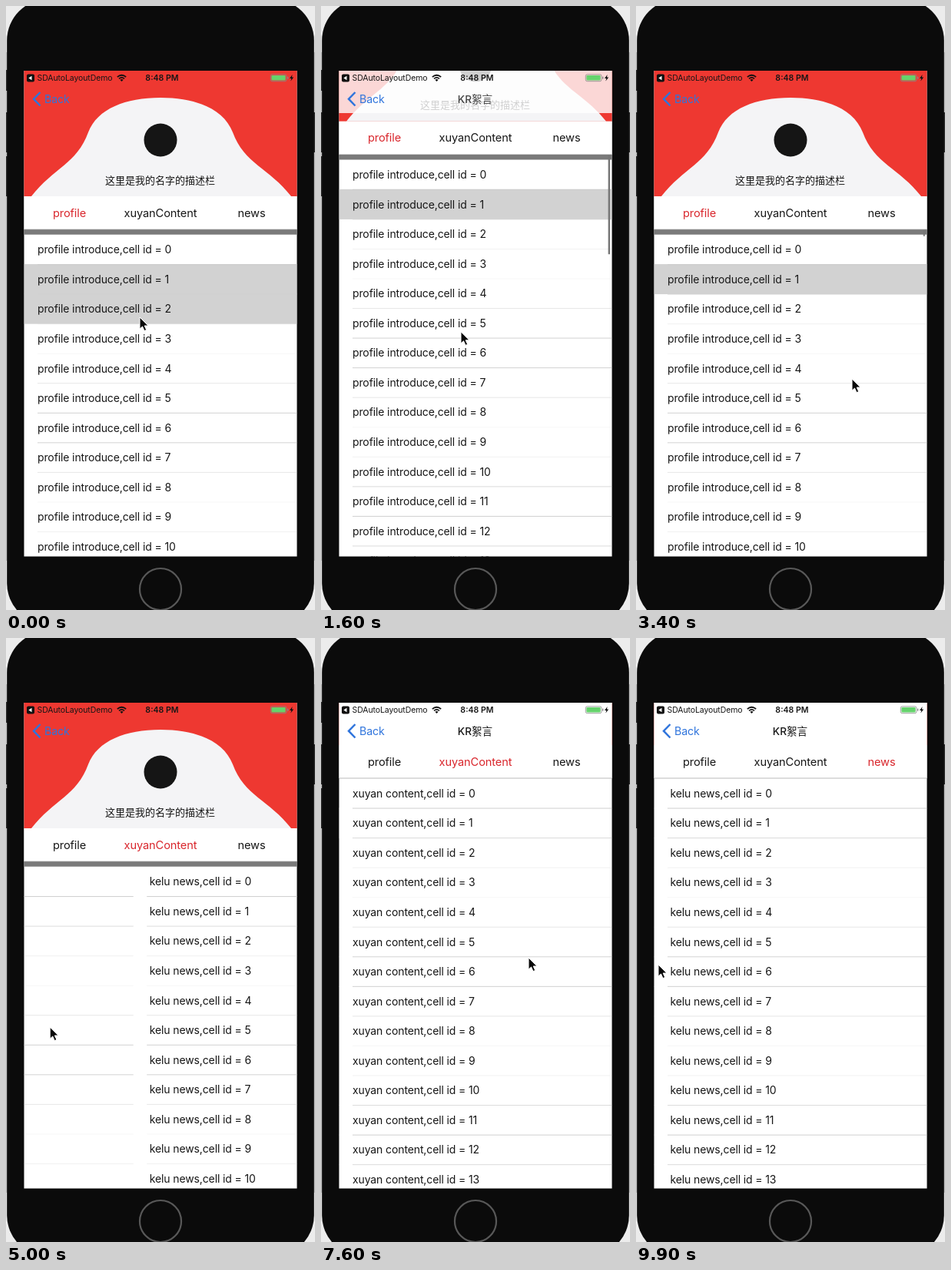
An HTML page for the animation above (10000 ms loop, 402 by 784 pixels).

```html
<!DOCTYPE html>
<html lang="zh-CN">
<head>
<meta charset="utf-8">
<title>Profile tabs</title>
<style>
  html, body { margin: 0; width: 100%; height: 100%; overflow: hidden; background: #e4e4e4; }
  svg { display: block; width: 100%; height: 100%; }
  text { font-family: Inter, "Noto Sans CJK SC", "Noto Sans CJK", sans-serif; fill: #161616; }
  .cell { font-size: 14px; letter-spacing: -.12px; }
  .tab { font-size: 14.6px; letter-spacing: -.1px; text-anchor: middle; }
  .mid { text-anchor: middle; }
</style>
</head>
<body>
<svg viewBox="0 0 402 784" preserveAspectRatio="none">
  <defs>
    <clipPath id="screenClip"><rect x="23.5" y="84" width="355" height="630.5"/></clipPath>
  </defs>
  <rect width="402" height="784" fill="#ececec"/>
  <rect y="60" width="402" height="660" fill="#c8c8c8"/>
  <g fill="#333">
    <rect y="83" width="3" height="27"/><rect y="138" width="3" height="52"/>
    <rect y="195" width="3" height="52"/><rect x="399" y="138" width="3" height="52"/>
  </g>
  <rect x="1.2" y="-9" width="399.6" height="812" rx="54" fill="#0b0b0b"/>
  <circle cx="201" cy="757" r="27" fill="none" stroke="#585858" stroke-width="2.2"/>

  <g clip-path="url(#screenClip)">
    <rect x="23" y="84" width="356" height="631" fill="#fff"/>
    <g id="pages"></g>
    <rect id="band" x="23" width="356" height="6.7" fill="#7a7a7a"/>
    <g id="header">
      <rect x="23" y="84" width="356" height="163" fill="#ee3831"/>
      <path d="M33 247C62 210 92 205 107 164C119 133 156 119 201 119S283 133 295 164C310 205 342 210 371 247Z" fill="#f4f4f6"/>
      <circle cx="201" cy="174" r="21.5" fill="#151515"/>
      <text class="mid" x="200.5" y="230.5" font-size="13">这里是我的名字的描述栏</text>
      <rect x="23" y="247" width="356" height="43" fill="#fff"/>
      <rect x="23" y="289.5" width="356" height=".7" fill="#bbb"/>
      <g id="tabs"></g>
    </g>
    <rect id="thumb" x="373.6" width="2.4" rx="1.2" fill="#777"/>

    <rect id="nav" x="23" y="84" width="356" height="55" fill="#fff"/>
    <text id="title" class="mid" x="200.5" y="125.5" font-size="13.6" font-weight="500">KR絮言</text>
    <path d="M44.5 112L36 120.7L44.5 129.5" fill="none" stroke="#2f74dc" stroke-width="2.5"/>
    <text x="50" y="126" font-size="14.2" letter-spacing="-.1" style="fill:#2f74dc">Back</text>

    <rect x="27" y="88.5" width="10" height="10" rx="2" fill="#111"/>
    <path d="M33.5 90.7L29.3 93.5L33.5 96.3Z" fill="#fff"/>
    <text x="40.5" y="97.3" font-size="10.5" letter-spacing="-.1">SDAutoLayoutDemo</text>
    <path d="M144.8 92.2Q150.5 87.3 156.2 92.2M147 94.4Q150.5 91.5 154 94.4" fill="none" stroke="#111" stroke-width="1.7"/>
    <path d="M148.4 95.8Q150.5 94.2 152.6 95.8L150.5 98Z" fill="#111"/>
    <text class="mid" x="203" y="97.3" font-size="10.6" font-weight="600">8:48 PM</text>
    <rect x="344.3" y="88.8" width="20.6" height="8.9" rx="2" fill="none" stroke="#888" stroke-width=".8"/>
    <rect x="345.4" y="89.9" width="18.2" height="6.7" rx="1" fill="#65d36c"/>
    <rect x="366" y="91.7" width="1.3" height="3" fill="#888"/>
    <path d="M372.6 89L369 93.9H371.2L370.4 97.6L374.2 92.5H371.9Z" fill="#111"/>
  </g>
  <path id="cursor" d="M0 0V15.2L3.5 12L6 17.6L8.7 16.4L6.2 11H11Z" fill="#080808" stroke="#fff" stroke-width="1"/>
</svg>
<script>
const LOOP = 10000, STEP = 100;
const PAGE = 355, ROW = 38.55, TOP = 297, ROWS = 19;
const STICK = 108, COLLAPSED = 114.5;
const SVG = 'http://www.w3.org/2000/svg';
const $ = id => document.getElementById(id);

function set(el, attrs) {
  for (const key in attrs) el.setAttribute(key, attrs[key]);
}
function add(parent, tag, attrs, text = '') {
  const el = document.createElementNS(SVG, tag);
  set(el, attrs);
  el.textContent = text;
  return parent.appendChild(el);
}
const clamp = (v, low = 0, high = 1) => Math.max(low, Math.min(high, v));
const ease = u => u * u * (3 - 2 * u);
const progress = (t, from, to) => ease(clamp((t - from) / (to - from)));
const mix = (a, b, u) => a + (b - a) * u;

// Each gesture drags from (x, y), either scrolling by pixels or turning a page.
const gestures = [
  { from: 1000, to: 2000, x: 182, y: 520, scroll: 150 },
  { from: 2400, to: 3300, x: 281, y: 332, scroll: -150 },
  { from: 3600, to: 4200, x: 281, y: 490, turn: 1 },
  { from: 4660, to: 5260, x: 270, y: 505, turn: 1 },
  { from: 5900, to: 6550, x: 268, y: 572, scroll: COLLAPSED },
  { from: 7000, to: 7500, x: 40, y: 430, turn: -1 },
  { from: 7700, to: 8200, x: 240, y: 400, scroll: -COLLAPSED },
  { from: 8500, to: 9020, x: 248, y: 527, scroll: COLLAPSED },
  { from: 9300, to: 9800, x: 240, y: 424, turn: 1 }
];

// Replays the gestures up to time t.
function stateAt(t) {
  const state = { scroll: 0, page: 0, settled: 0, thumb: 0, x: 174, y: 404 };
  let idleSince = 200;
  for (const { from, to, x, y, scroll = 0, turn = 0 } of gestures) {
    const reach = progress(t, idleSince, from), u = progress(t, from, to);
    state.x = clamp(mix(state.x, x, reach) - turn * PAGE * u, 29, 300);
    state.y = mix(state.y, y, reach) - scroll * u;
    state.scroll += scroll * u;
    state.page += turn * u;
    if (t >= to) state.settled += turn;
    if (scroll) state.thumb = Math.max(state.thumb, clamp((t - from) / 100) * clamp((to + 350 - t) / 300));
    idleSince = to;
  }
  return state;
}

const tabs = ['profile', 'xuyanContent', 'news'].map((name, i) =>
  add($('tabs'), 'text', { class: 'tab', x: 82.5 + 118.5 * i, y: 273.7 }, name));

const pressed = [1, 2].map(i => add($('pages'), 'rect',
  { x: 23.5, y: TOP + i * ROW - .5, width: PAGE, height: ROW + .5, fill: '#d2d2d2' }));

const pages = [['profile introduce', 41], ['xuyan content', 41], ['kelu news', 44.5]].map(([label, x], page) => {
  const g = add($('pages'), 'g', {});
  if (page === 0) g.append(...pressed);
  for (let i = 0; i < ROWS; i++) {
    const y = TOP + i * ROW;
    // Hairlines fade in and out down the list, as on a downscaled screen.
    const opacity = .55 + .4 * Math.cos(2 * Math.PI * i / 5.5);
    add(g, 'rect', { x: 41, y: y + ROW - .5, width: 337.5, height: 1, fill: '#cdcdcd', opacity });
    add(g, 'text', { class: 'cell', x, y: y + 24.3 }, `${label},cell id = ${i}`);
  }
  return g;
});

function draw(t) {
  const { scroll, page, settled, thumb, x, y } = stateAt(t);
  const stuck = Math.min(scroll, STICK);
  const cover = clamp((scroll - 30) / 84);

  pages.forEach((g, i) => set(g, { transform: `translate(${(i - page) * PAGE} ${-scroll})` }));
  pressed[1].style.display = t < 800 ? '' : 'none';
  set($('band'), { y: 290 - scroll });
  set($('header'), { transform: `translate(0 ${-stuck})` });
  tabs.forEach((el, i) => el.style.fill = i === settled ? '#d9262c' : '#161616');
  set($('thumb'), { y: 291 - stuck, height: 8 + 1.24 * scroll, opacity: thumb });
  set($('nav'), { opacity: cover });
  set($('title'), { opacity: cover });
  set($('cursor'), { transform: `translate(${x} ${y})` });
}

const start = performance.now();
function frame(now) {
  const t = Math.max(0, now - start) % LOOP;
  draw(Math.floor(t / STEP) * STEP);
  requestAnimationFrame(frame);
}
draw(0);
requestAnimationFrame(frame);
</script>
</body>
</html>
```
